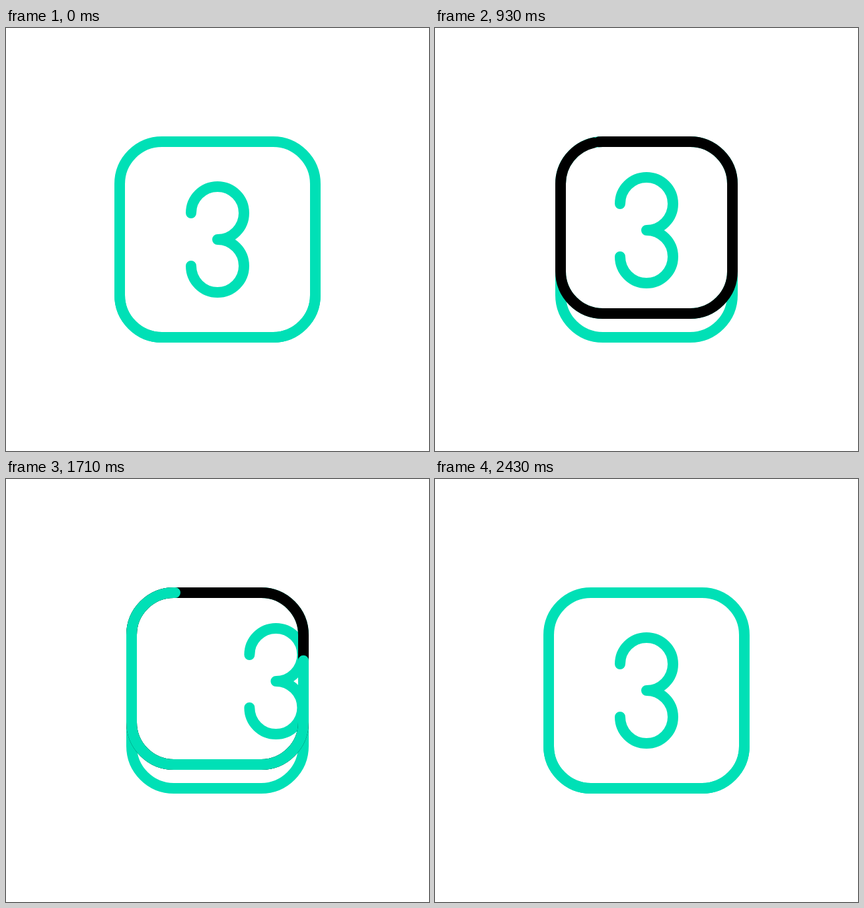
Write an HTML page with a canvas that moves like this. It is 640 by 640 pixels and loops after 3000 ms.

```html
<!DOCTYPE html>
<html lang="en">
<head>
<meta charset="utf-8">
<title>Key press</title>
<style>
  html, body { margin: 0; width: 100%; height: 100%; overflow: hidden; background: #fff; }
  canvas { display: block; width: 640px; height: 640px; }
</style>
</head>
<body>
<canvas width="640" height="640"></canvas>
<script>
const ctx = document.querySelector('canvas').getContext('2d');
const GREEN = '#00e0b6', BLACK = '#000';
const LOOP = 3000, STEP = LOOP / 42; // 14 pictures per second
const TOP = 172, BOTTOM = 468, RADIUS = 64;

// Smooth progress from 0 to 1 between two times
function ease(t, start, end) {
  const u = Math.min(1, Math.max(0, (t - start) / (end - start)));
  return u * u * (3 - 2 * u);
}

// Square cap of the key, clockwise from the lower end of its left side
function capPath(size) {
  const left = 320 - size / 2, right = left + size, bottom = TOP + size;
  const path = new Path2D();
  path.moveTo(left, bottom - RADIUS);
  path.arcTo(left, TOP, right, TOP, RADIUS);
  path.arcTo(right, TOP, right, bottom, RADIUS);
  path.arcTo(right, bottom, left, bottom, RADIUS);
  path.arcTo(left, bottom, left, TOP, RADIUS);
  path.closePath();
  return path;
}

// Lower rim of the key
function rimPath(size) {
  const left = 320 - size / 2, right = left + size, y = TOP + size - RADIUS;
  const path = new Path2D();
  path.moveTo(left, y);
  path.arcTo(left, BOTTOM, right, BOTTOM, RADIUS);
  path.arcTo(right, BOTTOM, right, y, RADIUS);
  path.lineTo(right, y);
  return path;
}

const three = new Path2D();
three.arc(320, 280, 40, Math.PI, Math.PI * 2.5);
three.arc(320, 360, 40, -Math.PI / 2, Math.PI);

function stroke(path, color) {
  ctx.strokeStyle = color;
  ctx.stroke(path);
}

function drawThree(dx, dy) {
  ctx.save();
  ctx.translate(dx, dy);
  stroke(three, GREEN);
  ctx.restore();
}

// Strokes part of the cap; start and length are fractions of its outline
function trace(path, size, color, start, length) {
  if (length <= 0) return;
  const total = 4 * (size - 2 * RADIUS) + 2 * Math.PI * RADIUS;
  if (length < 1) {
    ctx.setLineDash([length * total, (1 - length) * total]);
    ctx.lineDashOffset = -start * total;
  }
  stroke(path, color);
  ctx.setLineDash([]);
}

function draw(t) {
  const lift = ease(t, 200, 533) - ease(t, 1911, 2245);
  const size = 296 - 36 * lift;
  const cap = capPath(size);

  ctx.clearRect(0, 0, 640, 640);
  ctx.lineWidth = 16;
  ctx.lineCap = ctx.lineJoin = 'round';

  ctx.save();
  ctx.clip(cap);
  if (t < 1977) drawThree(176 * ease(t, 1450, 1977), -14 * lift);
  if (t > 1875) drawThree(-176 * (1 - ease(t, 1875, 2402)), 0);
  ctx.restore();

  stroke(rimPath(size), GREEN);
  stroke(cap, GREEN);
  if (t < 2245) {
    trace(cap, size, BLACK, 0.25 * ease(t, 286, 1000), ease(t, 0, 980));
    trace(cap, size, GREEN, 0.25 + 0.41 * ease(t, 1057, 2077), ease(t, 1057, 2077));
  }
}

function tick() {
  const time = performance.now() % LOOP;
  draw(Math.floor(time / STEP + 0.15) * STEP);
  requestAnimationFrame(tick);
}
tick();
</script>
</body>
</html>
```
